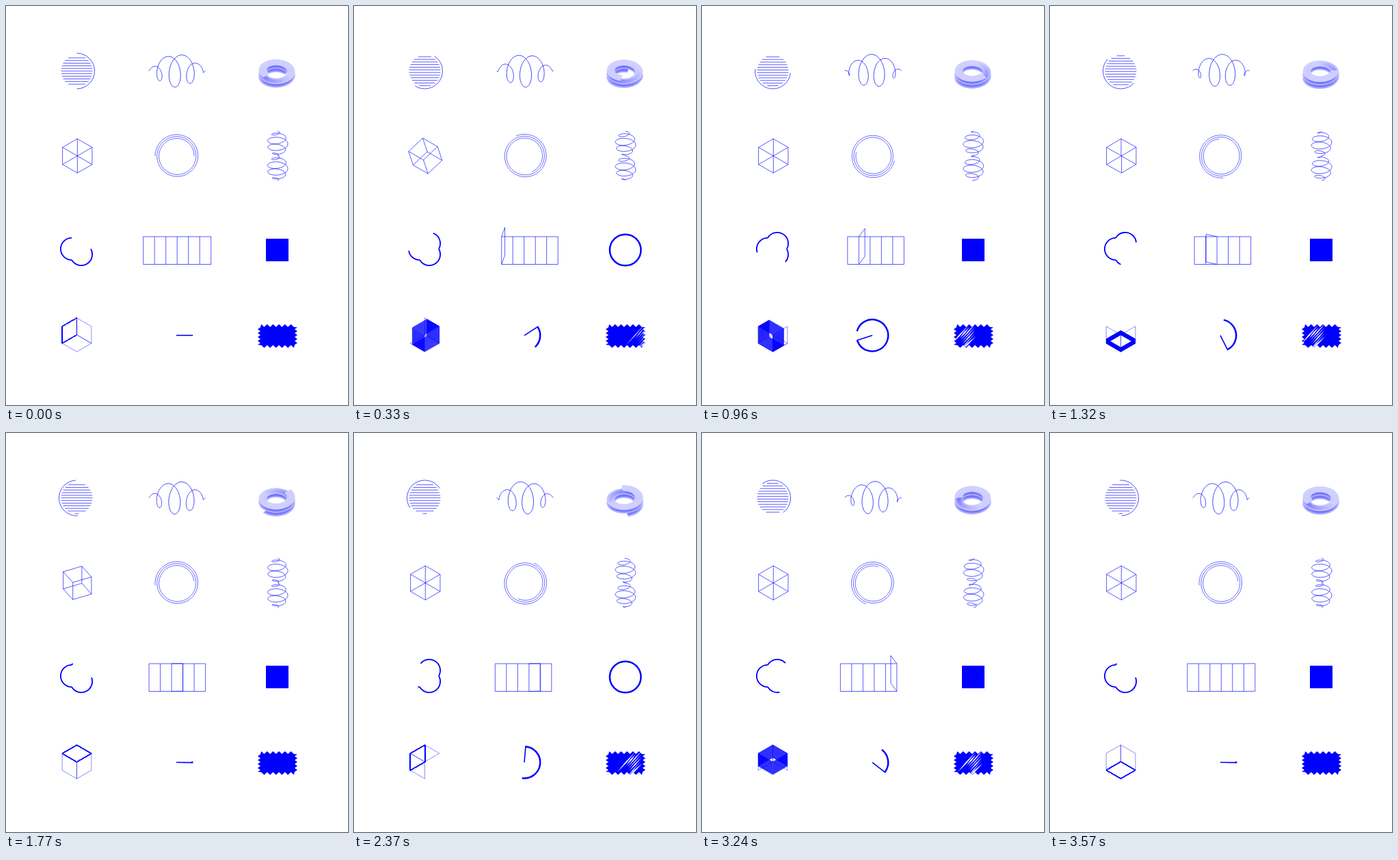
Write an HTML page with a canvas that moves like this. It is 500 by 583 pixels and loops after 3.6 s.

```html
<!DOCTYPE html>
<html lang="en">
<head>
<meta charset="utf-8">
<title>Twelve loops</title>
<style>
  html, body { margin: 0; width: 100%; height: 100%; overflow: hidden; background: #fff; }
  canvas { display: block; width: 500px; height: 583px; }
</style>
</head>
<body>
<canvas id="stage" width="500" height="583"></canvas>
<script>
const ctx = document.getElementById('stage').getContext('2d');
const { PI, sin, cos, min, max, abs, floor } = Math;
const TAU = 2 * PI, RAD = PI / 180, BLUE = '#00f';
const LOOP = 3600, HALF = 1800, BEAT = 600, STEP = 30;
const HAIR = .6;

const easeSine = p => (1 - cos(PI * p)) / 2;
const easeQuad = p => p < .5 ? 2 * p * p : 1 - 2 * (1 - p) ** 2;
const easeCubic = p => p < .5 ? 4 * p ** 3 : 1 - 4 * (1 - p) ** 3;

function addPath(points, closed) {
  points.forEach(([x, y], i) => i ? ctx.lineTo(x, y) : ctx.moveTo(x, y));
  if (closed) ctx.closePath();
}
// Strokes several paths at once, so that shared edges do not darken
function strokeAll(paths, width, closed) {
  ctx.beginPath();
  paths.forEach(p => addPath(p, closed));
  ctx.lineWidth = width;
  ctx.stroke();
}
function fillShape(points, color) {
  ctx.beginPath();
  addPath(points, true);
  ctx.fillStyle = color;
  ctx.fill();
}
function arc(x, y, r, from, to, width, back) {
  ctx.beginPath();
  ctx.arc(x, y, r, from, to, back);
  ctx.lineWidth = width;
  ctx.stroke();
}
// Samples f over 0..1
const sample = (n, f) => Array.from({ length: n + 1 }, (_, i) => f(i / n));

function sun(t) {
  const cx = 103.5, cy = 95, r = 23, gap = r / 6, rows = [];
  for (let k = 0; k < 12; k++) {
    const dy = -r + gap * (k + t % BEAT / BEAT);
    const w = Math.sqrt(max(0, r * r - dy * dy));
    if (w > 1) rows.push([[cx - w, cy + dy], [cx + w, cy + dy]]);
  }
  strokeAll(rows, .65);
  const a = TAU * t / LOOP - PI / 2;
  arc(cx, cy, 26, a, a + PI, .7);
}

function spring(t) {
  strokeAll([sample(400, s => {
    const c = 208.5 + 83 * s, amp = 24 * sin(PI * s);
    const phi = TAU * ((c - 247) / 21.3 - t / HALF) + PI;
    return [c + .57 * amp * sin(phi), 94.6 - amp * cos(phi)];
  })], .75);
}

function coil(t) {
  const cx = 396, n = 240, turns = 2.5, bands = 6;
  const tip = 137 * RAD - TAU * t / LOOP;
  const at = (s, f) => {
    const left = turns * (1 - s), a = tip + TAU * left;
    return [cx + (14.8 + 11.2 * f) * cos(a), 93 + 5 * left + (8.3 + 8.2 * f) * sin(a)];
  };
  for (let i = 0; i < n; i++) {
    const a = i / n, b = min(1, (i + 1.6) / n);
    const lower = min(1, max(0, (turns * (1 - a) - .7) * 2.5));
    for (let k = 0; k < bands; k++) {
      const f = k / bands, g = (k + 1) / bands;
      // Lower turns are shaded where the turn above covers them
      const shade = 208 - lower * 100 * (1 - (f + g - 1) ** 2);
      fillShape([at(a, f), at(b, f), at(b, g + .04), at(a, g + .04)], `rgb(${shade},${shade},255)`);
    }
  }
}

function cube(t) {
  const z = [0, 12.5], e = [10.83, 6.25], f = [10.83, -6.25];
  const [axis, u, v] = [[e, z, f], [z, e, f], [f, z, e]][floor(t / 1200)];
  const phi = PI / 2 * easeCubic(min(1, t % 1200 / 900));
  const mix = (a, b) => [0, 1].map(i => u[i] * a + v[i] * b);
  const U = mix(cos(phi), sin(phi)), V = mix(-sin(phi), cos(phi));
  const corner = (a, b, c) => [0, 1].map(i => [104.3, 219][i] + a * axis[i] + b * U[i] + c * V[i]);
  const edges = [];
  for (const p of [-1, 1]) for (const q of [-1, 1]) {
    edges.push([corner(-1, p, q), corner(1, p, q)],
               [corner(p, -1, q), corner(p, 1, q)],
               [corner(p, q, -1), corner(p, q, 1)]);
  }
  strokeAll(edges, .65);
}

function spiral(t) {
  strokeAll([sample(300, s => {
    const a = PI + TAU * (t / HALF + 2.5 * s), r = 32 - 7 * s;
    return [250 + r * cos(a), 219.2 + r * sin(a)];
  })], HAIR);
}

function hourglass(t) {
  strokeAll([sample(800, s => {
    const c = 183 + 72 * s, bulge = abs(sin(TAU * s));
    const phi = TAU * ((c - 188) / 9 - t / HALF);
    return [397 - 15 * bulge ** .65 * cos(phi), c - 7.5 * bulge * sin(phi)];
  })], .7);
}

function trefoil(t) {
  // Three half circles, counterclockwise: top, left, bottom
  const arcs = [[110, 347, 30], [96, 355, -90], [110, 363, 150]];
  const gap = 3 * t / HALF, from = gap % 3 + 1, to = from + 2;
  for (let k = 0; k < 6; k++) {
    const a = max(from - k, 0), b = min(to - k, 1);
    if (a >= b) continue;
    const [x, y, deg] = arcs[k % 3];
    arc(x, y, 16.1, deg * RAD - PI * a, deg * RAD - PI * b, 1.8, true);
  }
}

function panels(t) {
  const w = 16.5, top = 337, bottom = 377.5;
  const left = 217.2 - w * t / LOOP;
  const a = PI * easeQuad(t % BEAT / BEAT);
  const hinge = left + w * floor(t / BEAT);
  const x = hinge - w * cos(a), lift = 14 * sin(a);
  const right = left + 5 * w;
  const paths = [[[left, top], [right, top]], [[left, bottom], [right, bottom]],
                 [[hinge, top], [x, top - lift], [x, bottom - lift], [hinge, bottom]]];
  for (let k = 0; k < 6; k++) paths.push([[left + k * w, top], [left + k * w, bottom]]);
  strokeAll(paths, .65);
}

function blink(t) {
  const p = t % HALF;
  if (p >= 300 && p < 900) return arc(396.7, 356.5, 22.8, 0, TAU, 2.5);
  ctx.fillStyle = BLUE;
  ctx.fillRect(380, 340, 33, 33);
}

function faces(t) {
  const cx = 103.5, cy = 480.5, r = 24.7;
  const step = floor(t / BEAT), p = t % BEAT / BEAT;
  const rhombus = (k, shift) => {
    const dir = (k * 60 - 90) * RAD;
    const ox = cx - r * shift * cos(dir), oy = cy - r * shift * sin(dir);
    const tip = turn => [ox + r * cos(dir + turn), oy + r * sin(dir + turn)];
    return [[ox, oy], tip(-PI / 3), tip(0), tip(PI / 3)];
  };
  // One face at a time slides to the opposite side, leaving a trail
  const order = [5, 1, 3, 2, 4, 0], shown = [1, 3, 5];
  for (const k of order.slice(0, step)) shown[shown.indexOf(k)] = (k + 3) % 6;
  const reach = q => easeSine(min(1, q / .6));
  const head = reach(p), tail = 1 - reach(1 - p);
  strokeAll(shown.filter(k => k !== order[step]).map(k => rhombus(k, 0)), .45, true);
  strokeAll(sample(50, s => rhombus(order[step], tail + (head - tail) * s)), .5, true);
}

function fan(t) {
  const cx = 249, cy = 481.3, r = 23.2, p = t % HALF / HALF;
  const a = TAU * (.9 * easeSine(p) + .1 * p), b = TAU * (easeSine(p) + p) / 2;
  if (p > 0 && p < .5) arc(cx, cy, r, -a, b, 2.5);
  if (p >= .5) arc(cx, cy, r, b - TAU, TAU - a, 2.5);
  strokeAll([[[cx, cy], [cx + (r + 1) * cos(a), cy - (r + 1) * sin(a)]]], 1.6);
}

function stamp(t) {
  const x0 = 371, x1 = 423, y0 = 468, y1 = 496.5, h = 3, pts = [];
  const edge = (ax, ay, bx, by, teeth) => {
    const len = Math.hypot(bx - ax, by - ay), nx = (by - ay) / len, ny = (ax - bx) / len;
    for (let i = 0; i < teeth * 2; i++) {
      const s = (i + .5) / (teeth * 2), d = i % 2 ? -h / 3 : h;
      pts.push([ax + (bx - ax) * s + nx * d, ay + (by - ay) * s + ny * d]);
    }
  };
  edge(x0, y0, x1, y0, 6);
  edge(x1, y0, x1, y1, 5);
  edge(x1, y1, x0, y1, 6);
  edge(x0, y1, x0, y0, 5);
  ctx.save();
  fillShape(pts, BLUE);
  ctx.clip();

  // White slivers sweep left, then drift back
  const p = t % HALF;
  const amount = min(1, max(0, (p - 120) / 400), max(0, (1740 - p) / 300));
  const cx = p < 1140 ? 440 - 62 * p / 1140 : 378 + 12 * (p - 1140) / 180;
  const random = i => { const v = sin(i * 127.1 + 3.7) * 43758.5453; return v - floor(v); };
  for (let i = 0; i < 7 && amount > 0; i++) {
    const along = (random(i) - .5) * 18, across = (i - 3) * 3;
    const len = 10 + 11 * random(i + 20), w = (.5 + .8 * random(i + 40)) * amount;
    const a = -(42 + 8 * random(i + 60)) * RAD, ux = cos(a), uy = sin(a);
    const x = cx + along * ux - across * uy, y = 482 + along * uy + across * ux;
    fillShape([[x - len * ux, y - len * uy], [x - w * uy, y + w * ux],
               [x + len * ux, y + len * uy], [x + w * uy, y - w * ux]], '#fff');
  }
  ctx.restore();
}

const icons = [sun, spring, coil, cube, spiral, hourglass, trefoil, panels, blink, faces, fan, stamp];

function draw() {
  const t = floor(performance.now() % LOOP / STEP) * STEP;
  ctx.fillStyle = '#fff';
  ctx.fillRect(0, 0, 500, 583);
  ctx.strokeStyle = BLUE;
  for (const icon of icons) icon(t);
  requestAnimationFrame(draw);
}
draw();
</script>
</body>
</html>
```
